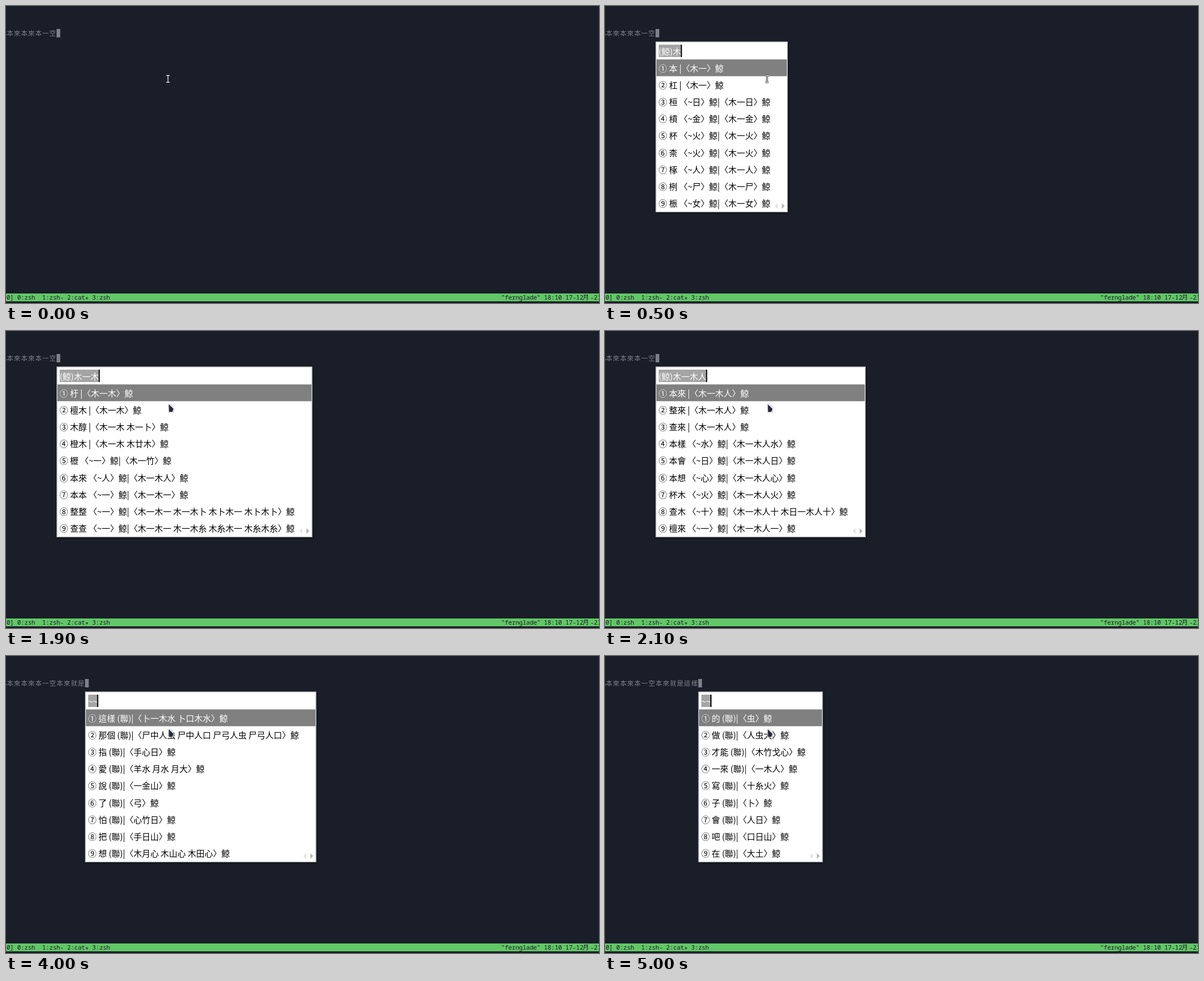
An HTML page for the animation above (8000 ms loop, 1058x530 px).

```html
<!DOCTYPE html>
<html lang="zh-Hant">
<head>
<meta charset="utf-8">
<style>
html, body { margin: 0; width: 100%; height: 100%; overflow: hidden; background: #1a1e28; }
svg { display: block; width: 1058px; height: 530px; }
text { white-space: pre; }
.term { font: 300 11.6px "Noto Sans CJK TC", "Noto Sans CJK", sans-serif; letter-spacing: 1.1px; fill: #7d818d; }
.bar { font: 11px "Noto Sans Mono", "Noto Sans CJK TC", monospace; letter-spacing: -.24px; fill: #1a1e28; }
.list { font: 15px "Noto Sans CJK TC", "Noto Sans CJK", sans-serif; fill: #000; }
.list .on { fill: #fff; }
</style>
</head>
<body>
<svg id="stage" viewBox="0 0 1058 530">
  <defs>
    <filter id="shade" x="-10%" y="-10%" width="120%" height="120%">
      <feDropShadow dx="1" dy="1" stdDeviation="2" flood-color="#000" flood-opacity=".45"/>
    </filter>
  </defs>
  <rect width="1058" height="530" fill="#1a1e28"/>
  <rect y="50" width="1" height="2" fill="#7d818d"/>
  <text id="typed" class="term" x="1.4" y="53"></text>
  <rect id="block" y="41" width="6.6" height="15" fill="#7d818d"/>
  <rect y="513" width="1058" height="14" fill="#62c766"/>
  <text class="bar" x="1" y="524">0] 0:zsh  1:zsh- 2:cat<tspan dy="2.5">*</tspan><tspan dy="-2.5"> 3:zsh</tspan></text>
  <text class="bar" x="883.5" y="524">"fernglade" 18:10 17-12</text>
  <text class="bar" x="1029" y="524">月</text>
  <text class="bar" x="1042.5" y="524">-21</text>
  <g id="popup" class="list"></g>
  <g id="beam" fill="none">
    <path d="M286 124h2.5l.5.7.5-.7h2.5M289 124.5v11M286 136h2.5l.5-.7.5.7h2.5" stroke="#1a1e28" stroke-width="3"/>
    <path d="M286 124h2.5l.5.7.5-.7h2.5M289 124.5v11M286 136h2.5l.5-.7.5.7h2.5" stroke="#e4e6ea" stroke-width="1.3"/>
  </g>
  <g id="arrow" filter="url(#shade)">
    <path d="M290.3 130.5L299 139 296.6 144.5 290.8 144.5Z" fill="#262c3a" stroke="#fff" stroke-width="2" paint-order="stroke" stroke-linejoin="round"/>
  </g>
</svg>
<script>
const LOOP = 8000, CELL = 12.7, ROW = 30.14;
const $ = id => document.getElementById(id);

const base = "本來本來本一空";
const first = ["本 |〈木一〉鯨", "杠 |〈木一〉鯨",
  ...["桓日", "槓金", "杯火", "柰火", "椓人", "栵尸", "桭女"]
    .map(([word, key]) => `${word} 〈~${key}〉鯨|〈木一${key}〉鯨`)];
const second = ["杅 |〈木一木〉鯨", "檀木 |〈木一木〉鯨", "木醇 |〈木一木 木一卜〉鯨",
  "橙木 |〈木一木 木廿木〉鯨", "櫪 〈~一〉鯨|〈木一竹〉鯨", "本來 〈~人〉鯨|〈木一木人〉鯨",
  "本本 〈~一〉鯨|〈木一木一〉鯨", "整整 〈~一〉鯨|〈木一木一 木一木卜 木卜木一 木卜木卜〉鯨",
  "查查 〈~一〉鯨|〈木一木一 木一木糸 木糸木一 木糸木糸〉鯨"];
const third = ["本來 |〈木一木人〉鯨", "整來 |〈木一木人〉鯨", "查來 |〈木一木人〉鯨",
  "本樣 〈~水〉鯨|〈木一木人水〉鯨", "本會 〈~日〉鯨|〈木一木人日〉鯨", "本想 〈~心〉鯨|〈木一木人心〉鯨",
  "杯木 〈~火〉鯨|〈木一木人火〉鯨", "查木 〈~十〉鯨|〈木一木人十 木日一木人十〉鯨",
  "檀來 〈~一〉鯨|〈木一木人一〉鯨"];

// "word codes" becomes a linked-phrase candidate
const linked = list => list.map(s => {
  const cut = s.indexOf(" ");
  return `${s.slice(0, cut)} (聯)|〈${s.slice(cut + 1)}〉鯨`;
});
const after1 = linked(["就是 糸山日人 卜山日人", "面目 一中月山 一田月山", "是 日人", "的 虫", "有 大月",
  "在 大土", "會 人日", "地 土心木", "想 木月心 木山心 木田心"]);
const after2 = linked(["這樣 卜一木水 卜口木水", "那個 尸中人虫 尸中人口 尸弓人虫 尸弓人口", "指 手心日",
  "愛 羊水 月水 月大", "說 一金山", "了 弓", "怕 心竹日", "把 手日山", "想 木月心 木山心 木田心"]);
const after3 = linked(["的 虫", "做 人虫大", "才能 木竹戈心", "一來 一木人", "寫 十糸火", "子 卜",
  "會 人日", "吧 口日山", "在 大土"]);

const scene = (at, typed, input, inputW, right, rows) => ({ at, typed, input, inputW, right, rows });
const scenes = [
  scene(0, base),
  scene(500, base, "(鯨)木", 40, 326, first),
  scene(600, base, "(鯨)木一", 55, 326, first),
  scene(1900, base, "(鯨)木一木", 70, 546.5, second),
  scene(2100, base, "(鯨)木一木人", 85, 465, third),
  scene(2700, base + "本來", "~~", 16.5, 404.5, after1),
  scene(4000, base + "本來就是", "~~", 16.5, 553.5, after2),
  scene(5000, base + "本來就是這樣", "~~", 16.5, 388.5, after3)
];

const rect = (x, y, w, h, fill, extra = "") =>
  `<rect x="${x}" y="${y}" width="${w}" height="${h}" fill="${fill}" ${extra}/>`;
const label = (x, y, s, on) => `<text x="${x}" y="${y}"${on ? ' class="on"' : ""}>${s}</text>`;

function popup(s, left) {
  const x = left + 5.5, w = s.right - left;
  let out = rect(left, 63.5, w, 304.5, "#c9cccd", 'filter="url(#shade)"')
    + rect(left + 1.5, 65, w - 3, 301.5, "#fff")
    + rect(left + 1.5, 95.3, w - 3, 30, "#808080")
    + rect(x, 69, s.inputW, 22, "#a4a4a4")
    + label(x, 86.6, s.input, true)
    + rect(x + s.inputW - .5, 69, 2, 22, "#000");
  s.rows.forEach((row, i) => {
    out += label(x, 116.8 + i * ROW, String.fromCharCode(0x2460 + i) + " " + row, i === 0);
  });
  return out + `<path d="M${s.right - 18} 352v10l-5-5z" fill="#e2e2e2"/>`
    + `<path d="M${s.right - 10.5} 352v10l5-5z" fill="#b4b4b4"/>`;
}

let shown = null;
function draw(t) {
  const s = scenes.findLast(c => c.at <= t);
  $("beam").style.display = t < 700 ? "" : "none";
  $("arrow").style.display = t < 700 ? "none" : "";
  if (s === shown) return;
  shown = s;
  const left = 1.5 + s.typed.length * CELL;
  $("typed").textContent = s.typed;
  $("block").setAttribute("x", left - .2);
  $("popup").innerHTML = s.rows ? popup(s, left - .1) : "";
}

const start = performance.now();
function tick() {
  draw((performance.now() - start) % LOOP);
  requestAnimationFrame(tick);
}
tick();
</script>
</body>
</html>
```
